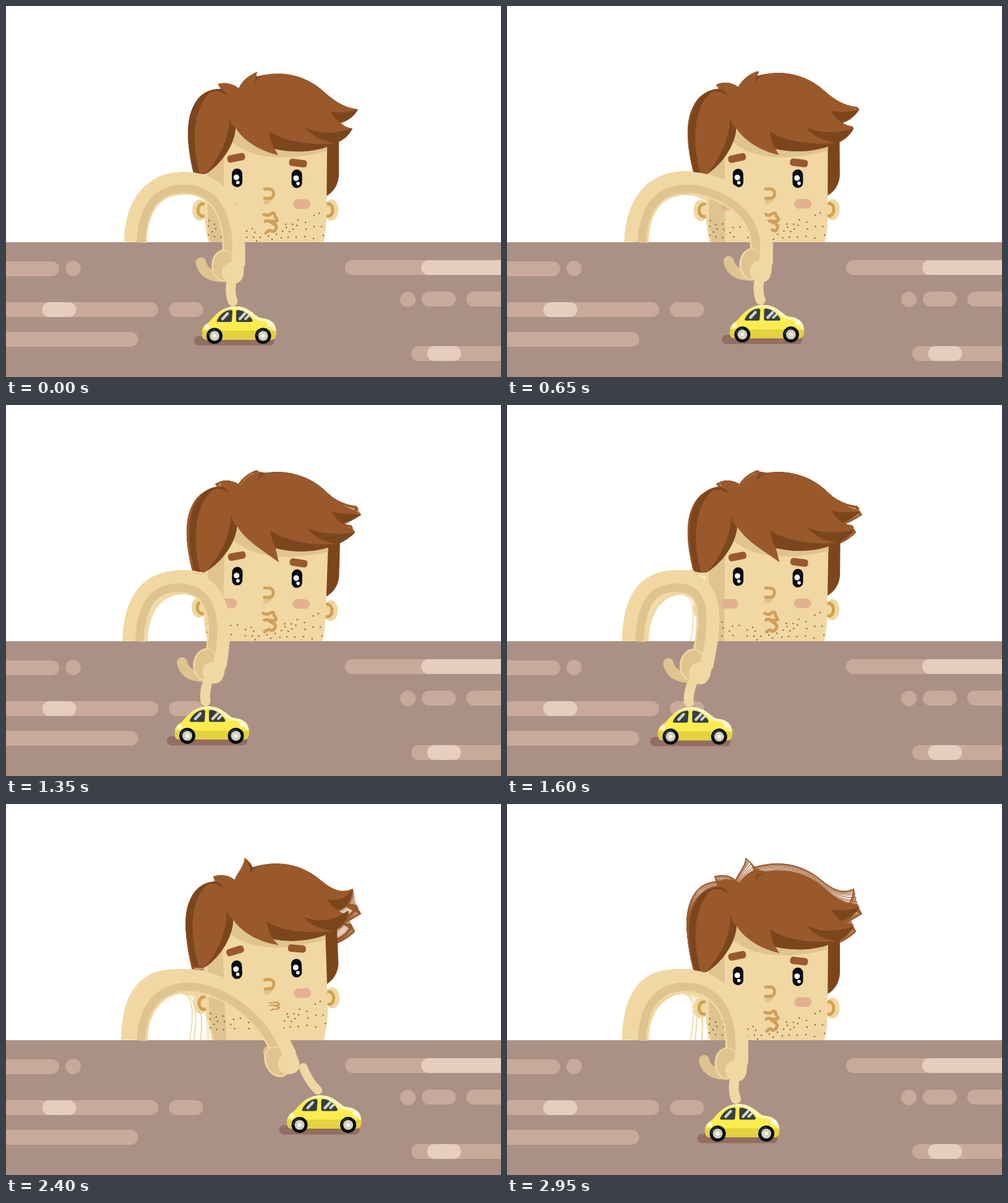
An HTML page with a canvas that plays this animation: 800x600 px, repeating every 3000 ms.

```html
<!DOCTYPE html>
<html lang="en">
<head>
<meta charset="utf-8">
<title>Toy car</title>
<style>
html, body { margin: 0; width: 100%; height: 100%; overflow: hidden; background: #fff; }
canvas { display: block; }
</style>
</head>
<body>
<canvas id="stage" width="800" height="600"></canvas>
<script>
const ctx = document.getElementById('stage').getContext('2d');
const SKIN = '#f1d7a2', SHADE = '#dfc48f', LINE = '#cf9f5b', HAIR = '#9a592b', DARK = '#7c461d';
const BLUSH = '#e4b092', INK = '#070c0e';
const LOOP = 3000, STEP = 50, RAD = Math.PI / 180;

// time, car x, car y, hand angle, head angle, head lift, hair swing, fringe drop
const KEYS = [
  [0, 337, 533.5, 0, 0, 0, 0, 0],
  [400, 377, 531.5, 0, -1.2, 0, 0, 0],
  [600, 381, 531.3, 0, -.6, 0, .1, 0],
  [950, 360, 532.5, 0, 1.2, 0, .55, 0],
  [1350, 293, 535, 7.5, 1.5, 0, .55, 1],
  [1520, 252, 537, 12, 1, 0, .4, 1],
  [1850, 368, 530, -5.5, -1.2, 0, 0, 1],
  [2200, 474, 519.5, -27, -2.2, 10.5, -.85, .3],
  [2400, 474.5, 519, -28, -2.4, 12, -1, 0],
  [2700, 425, 524.5, -16, -.3, 1, 0, 0],
  [2950, 340.5, 533, 0, 0, 0, 0, 0],
  [LOOP, 337, 533.5, 0, 0, 0, 0, 0]
];

const rise = (i, c) => (KEYS[i + 1][c] - KEYS[i][c]) / (KEYS[i + 1][0] - KEYS[i][0]);

function slope(i, c) {
  if (i === 0 || i === KEYS.length - 1) return 0;
  const a = rise(i - 1, c), b = rise(i, c);
  return a * b <= 0 ? 0 : 2 * a * b / (a + b);
}

// Smooth monotone interpolation between keys
function pose(t) {
  let i = 0;
  while (t >= KEYS[i + 1][0]) i++;
  const span = KEYS[i + 1][0] - KEYS[i][0], u = (t - KEYS[i][0]) / span;
  const at = c => {
    const a = KEYS[i][c], b = KEYS[i + 1][c], v = 1 - u;
    return a * v * v * (1 + 2 * u) + b * u * u * (3 - 2 * u) +
      span * u * v * (slope(i, c) * v - slope(i + 1, c) * u);
  };
  const [x, y, hand, head, lift, swing, drop] = [1, 2, 3, 4, 5, 6, 7].map(at);
  return { x, y, hand, head, lift, swing, drop };
}

function fill(shape, color) {
  ctx.fillStyle = color;
  ctx.fill(typeof shape === 'string' ? new Path2D(shape) : shape);
}

function stroke(shape, color, width, cap = 'round') {
  ctx.strokeStyle = color;
  ctx.lineWidth = width;
  ctx.lineCap = cap;
  ctx.lineJoin = 'round';
  ctx.stroke(typeof shape === 'string' ? new Path2D(shape) : shape);
}

function oval(x, y, rx, color, ry = rx) {
  ctx.beginPath();
  ctx.ellipse(x, y, rx, ry, 0, 0, 7);
  ctx.fillStyle = color;
  ctx.fill();
}

function pill(x, y, w, h, color, r = h / 2) {
  ctx.beginPath();
  ctx.roundRect(x, y, w, h, r);
  ctx.fillStyle = color;
  ctx.fill();
}

function brow(x, y, angle) {
  ctx.save();
  ctx.translate(x, y);
  ctx.rotate(angle * RAD);
  pill(-14.5, -6, 29, 12, HAIR, 5);
  ctx.restore();
}

function eye(x, y, shine) {
  pill(x - 8.5, y - 15, 17, 30, INK, 8.5);
  oval(x - 1.2, y - 1, 4.6, '#fff');
  oval(x + shine, y + 7.5, 2.8, '#fff');
}

const STUBBLE = [
  328,347, 327,356, 337,353, 333,365, 327,370, 339,360, 348,352, 350,361, 337,373, 348,374,
  360,366, 365,358, 366,373, 376,357, 389,364, 398,360, 402,366, 389,374, 400,374, 411,374,
  405,380, 424,372, 430,377, 437,369, 452,353, 463,353, 472,346, 484,350, 498,339, 506,335,
  485,361, 498,357, 510,357, 464,361, 470,355, 453,358, 447,364, 445,375, 458,365, 456,374,
  469,374, 483,373, 497,376, 513,371
];

const LEFT_EDGE = 'M322,272C312,272 306,271 303,270C292,225 290,185 304,160C313,142 328,134 347,134';

function hairTips({ swing: s, drop }) {
  return {
    tuft: `${407 + 13 * s},${106 + 8 * s}`,
    upper: `${569 + 3 * s},${167 + 12 * s}`,
    lower: `${560 + 3 * s},${198 + 8 * s}`,
    fringe: `${440 - 3 * Math.min(0, s)},${241 + 13 * drop}`
  };
}

const hairShape = tip => new Path2D(`${LEFT_EDGE}L342,126C356,122 368,126 376,133
  C382,120 392,112 ${tip.tuft}C405,109 404,111 405,114C450,102 485,114 510,135
  C530,153 545,164 ${tip.upper}C563,178 553,186 541,189C547,195 553,197 ${tip.lower}
  C554,210 545,217 533,222C505,236 468,239 434,231L${tip.fringe}
  C415,236 385,220 371,197C370,222 350,255 322,272Z`);

function placeHead({ head, lift }) {
  ctx.translate(420, 290 - lift);
  ctx.rotate(head * RAD);
  ctx.translate(-420, -290);
}

function drawHair(p) {
  const tip = hairTips(p);
  fill(hairShape(tip), HAIR);
  [
    `${LEFT_EDGE}C352,137 356,140 358,146C350,138 340,136 331,139C300,165 300,225 313,271Z`,
    'M361,177C362,188 366,193 371,197C370,222 350,255 322,272C342,250 362,215 361,177Z',
    `M403,129C402,119 408,114 420,111L405,114C404,111 405,109 ${tip.tuft}C403,112 402,119 403,129Z`,
    `M524,170C540,174 555,172 ${tip.upper}C563,178 553,186 541,189C535,185 528,179 524,170Z`,
    `M484,197C510,208 535,206 ${tip.lower}C554,210 545,217 533,222C512,219 495,211 484,197Z`,
    'M425,202C445,218 490,226 533,222C505,236 468,239 434,231Q427,220 425,202Z'
  ].forEach(d => fill(d, DARK));
}

function drawMouth(m, wiggle) {
  ctx.save();
  ctx.translate(428 + 4 * m, 350 - 11 * m);
  ctx.scale(1 - .25 * m, 1 - .6 * m);
  ctx.translate(-428, -350);
  const w = wiggle;
  stroke(`M417,337C421,339 424,339 427,337C430,334 434,334 434,338C434,341 ${438 + w},342 438,346
    C438,349 434,348 430,348C425,348 422,${346 + w} 419,348
    M427,349C432,352 ${438 + w},354 437,358C436,362 434,366 429,${364 - w}C425,361 423,365 420,367`, LINE, 5);
  ctx.restore();
}

function drawHead(p, frame) {
  const m = p.lift / 12;
  ctx.save();
  placeHead(p);
  oval(313, 330, 12, SKIN, 17);
  oval(526, 330, 11.5, SKIN, 17);
  stroke('M320,320C307,318 307,342 320,340', '#cfa24f', 5);
  stroke('M519,320C531,318 531,342 519,340', '#cfa24f', 5);
  fill('M517,200H538V275Q536,297 517,308Z', DARK);
  fill('M321,250V340Q322,370 336,410H505Q518,375 518,340L519,215L371,190Z', SKIN);
  fill('M326,245L352,220V410H336Q326,370 326,340Z', SHADE);
  fill('M371,195L366,220C400,250 460,250 519,235V215Z', SHADE);

  pill(346, 314.5, 28, 15.5, BLUSH);
  pill(464, 312.5, 28, 15.5, BLUSH);
  eye(373.5, 278, 1.2);
  eye(470, 279.5, 2);
  brow(372, 245.5 + 2 * m, -12 - 3 * m);
  brow(472, 254 - 6 * m, 7);

  fill('M416,311H431Q429,321 417,321Z', SHADE);
  stroke('M418,296H425C435,296 435,311 425,311H418', LINE, 4.8);
  drawMouth(m, 2 * Math.sin(frame * 2.1));
  for (let i = 0; i < STUBBLE.length; i += 2) oval(STUBBLE[i], STUBBLE[i + 1], 1.25, '#8b6a45');
  drawHair(p);
  ctx.restore();
}

function drawTable() {
  const plank = '#c9aa9a', light = '#e6cdbd';
  ctx.fillStyle = '#ab9185';
  ctx.fillRect(0, 382, 800, 218);
  [
    [-20, 413, 106], [96, 412, 25], [-6, 479, 252], [263.5, 479, 55], [-20, 527, 233.5],
    [548, 411, 280], [637, 462, 25], [672, 462, 55], [744, 462, 80], [655, 550, 170],
    [58.5, 479, 55, light], [671, 411, 150, light], [680.5, 550, 55, light]
  ].forEach(([x, y, w, color = plank]) => pill(x, y, w, w === 25 ? 25 : 24, color));
}

function handAt(p) {
  return [p.x + 31 + 1.8 * p.hand, p.y - 108.5 - .12 * Math.min(0, p.hand)];
}

// Centre line of the arm as points with normals facing the inside of the arch
function armLine(p) {
  const [hx, hy] = handAt(p), a = p.hand * RAD, d = p.x - 337;
  const up = n => [hx + n * Math.sin(a), hy - n * Math.cos(a)];
  const base = 209 + .05 * Math.min(0, d);
  const top = 288 + .18 * Math.min(0, d) + .05 * Math.max(0, d);
  const curves = [
    [[base, 382], [base + 2, 322], [top - 50, 286.5], [top, 286.5]],
    [[top, 286.5], [top + 49, 286.5], up(101), up(35)],
    [up(35), up(25), up(15), up(5)]
  ];
  const points = [];
  for (const c of curves) for (let i = 0; i <= 20; i++) {
    const u = i / 20, v = 1 - u;
    const pos = k => v * v * v * c[0][k] + 3 * v * v * u * c[1][k] + 3 * v * u * u * c[2][k] + u * u * u * c[3][k];
    const vel = k => v * v * (c[1][k] - c[0][k]) + 2 * v * u * (c[2][k] - c[1][k]) + u * u * (c[3][k] - c[2][k]);
    const dx = vel(0), dy = vel(1), len = Math.hypot(dx, dy);
    points.push([pos(0), pos(1), -dy / len, dx / len]);
  }
  return points;
}

function offsetPath(points, n) {
  const path = new Path2D();
  points.forEach(([x, y, nx, ny]) => path.lineTo(x + nx * n, y + ny * n));
  return path;
}

function drawArm(p) {
  const [hx, hy] = handAt(p), bend = Math.max(0, -p.hand) / 28, line = armLine(p);
  const tx = hx - 53 + 22 * bend, ty = hy - 10 - 4 * bend;
  stroke(`M${tx},${ty}Q${tx + 5},${ty + 23} ${hx - 16},${hy + 13}`, SHADE, 17);
  stroke(offsetPath(line, 0), SKIN, 37, 'butt');
  stroke(offsetPath(line, 9), SHADE, 13.5, 'butt');

  ctx.save();
  ctx.translate(hx, hy);
  ctx.rotate(p.hand * RAD);
  oval(-16, -5, 20, SKIN, 26);
  oval(-15, -5, 18, SHADE, 24);
  fill('M-2,-30H18.5L16,8Q13,24 0,24Q-18,22 -19,6Q-19,-7 -4,-11Z', SKIN);
  ctx.restore();

  const kx = hx - 4 - 1.05 * p.hand, ky = hy + 22 + .35 * Math.min(0, p.hand);
  const fx = p.x + 29.5, fy = p.y - 56;
  stroke(`M${kx},${ky}Q${(kx + fx) / 2 - 4},${(ky + fy) / 2 + 3} ${fx},${fy}`, SKIN, 16 - 2 * bend);
}

const BODY = new Path2D(`M-20,-3C-21,-14 -16,-18 -8,-23C4,-38 16,-48 34,-48C58,-48 66,-30 76,-29
  C91,-28 99,-20 100,-8C100,1 98,6 92,6H-12C-18,6 -20,3 -20,-3Z`);

function wheel(x) {
  oval(x, 0, 13, INK);
  ctx.beginPath();
  ctx.arc(x, 0, 10, 3.2, 4.8);
  ctx.strokeStyle = '#3a464b';
  ctx.lineWidth = 1.5;
  ctx.stroke();
  oval(x, 0, 8, '#d2d1bf');
  oval(x, 0, 3, '#fbfaf0');
}

function drawCar({ x, y }) {
  ctx.save();
  ctx.translate(x, y);
  pill(-33, .5, 130, 15, '#926d60');
  ctx.save();
  ctx.clip(BODY);
  fill(BODY, '#fff6bd');
  ctx.translate(-4, 4);
  fill(BODY, '#fdec50');
  ctx.translate(4, -4);
  ctx.fillStyle = '#e4d240';
  ctx.fillRect(-22, -8.5, 124, 16);
  oval(-12.5, -14.5, 3.8, '#fffbdc');
  oval(91, -18.5, 5.5, '#fffbdc', 4);
  ctx.restore();

  const glass = '#333f45', glint = '#d4d3c2';
  fill('M4,-25C8,-34 16,-41 26,-42Q29,-42 29,-39L28,-25Q28,-22.5 25,-22.5H6Q3.500,-22.5 4,-25Z', glass);
  fill('M35,-39Q35,-42 38,-42C49,-41 56,-34 61,-26Q62,-22.5 59,-22.5H38Q35,-22.5 35,-25Z', glass);
  stroke('M13,-27.500L21,-36M41,-27.500L49,-36', glint, 4.5);
  stroke('M50,-27.500L55,-32.500', glint, 4);
  wheel(0);
  wheel(78.5);
  ctx.restore();
}

// Thin outlines left behind by earlier poses
function drawTrails(frame) {
  for (let i = 0; i < frame; i++) {
    const p = pose(i * STEP), line = armLine(p);
    ctx.save();
    placeHead(p);
    stroke(hairShape(hairTips(p)), HAIR, .8);
    ctx.restore();
    stroke(offsetPath(line, 18.5), SKIN, 1.2);
    stroke(offsetPath(line, -18.5), SKIN, 1.2);
  }
}

const start = performance.now();

function draw() {
  const frame = Math.floor((performance.now() - start) % LOOP / STEP);
  const p = pose(frame * STEP);
  ctx.fillStyle = '#fff';
  ctx.fillRect(0, 0, 800, 600);
  drawTrails(frame);
  drawHead(p, frame);
  drawTable();
  drawCar(p);
  drawArm(p);
  requestAnimationFrame(draw);
}
draw();
</script>
</body>
</html>
```
